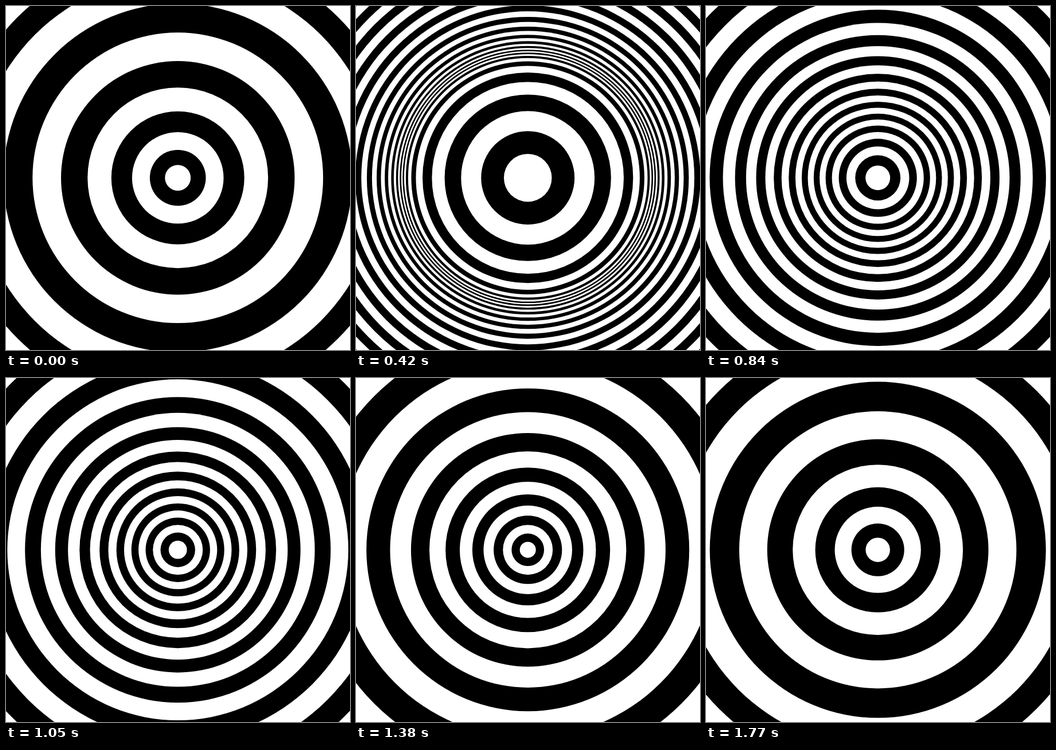
An HTML page with a canvas for the animation above (1800 ms loop, 600 by 600 pixels).

```html
<!DOCTYPE html>
<html lang="en">
<head>
<meta charset="utf-8">
<title>Rippling rings</title>
<style>
  html, body { margin: 0; width: 100%; height: 100%; overflow: hidden; background: #fff; }
  canvas { display: block; }
</style>
</head>
<body>
<canvas id="stage" width="600" height="600"></canvas>
<script>
const ctx = document.getElementById('stage').getContext('2d');
const LOOP = 1800, STEP = 30;
const RINGS = 48, CENTER = 299.7;
const SPACING = 20.92;            // ring spacing at the middle, at rest
const DEPTH = 0.502;              // wave height relative to the viewing distance
const rad = deg => deg * Math.PI / 180;

// Flat ring radius, magnified as the travelling wave lifts it toward the viewer.
// The rings crowd together a little toward the rim.
function radius(n, angle) {
  const flat = n * (1 - 0.005 * n - 0.00007 * n * n);
  return SPACING * flat / (1 - DEPTH * Math.sin(rad(angle + 9.4 * flat)));
}

function draw(time) {
  const angle = Math.floor(time % LOOP / STEP) * STEP / LOOP * 360 - 1;
  ctx.fillStyle = '#fff';
  ctx.fillRect(0, 0, 600, 600);
  // Inner discs cover outer ones where the surface folds over.
  for (let n = RINGS; n > 0; n--) {
    ctx.fillStyle = n % 2 ? '#fff' : '#000';
    ctx.beginPath();
    ctx.arc(CENTER, CENTER, radius(n, angle), 0, 2 * Math.PI);
    ctx.fill();
  }
}

const start = performance.now();
function tick() {
  draw(performance.now() - start);
  requestAnimationFrame(tick);
}
tick();
</script>
</body>
</html>
```
